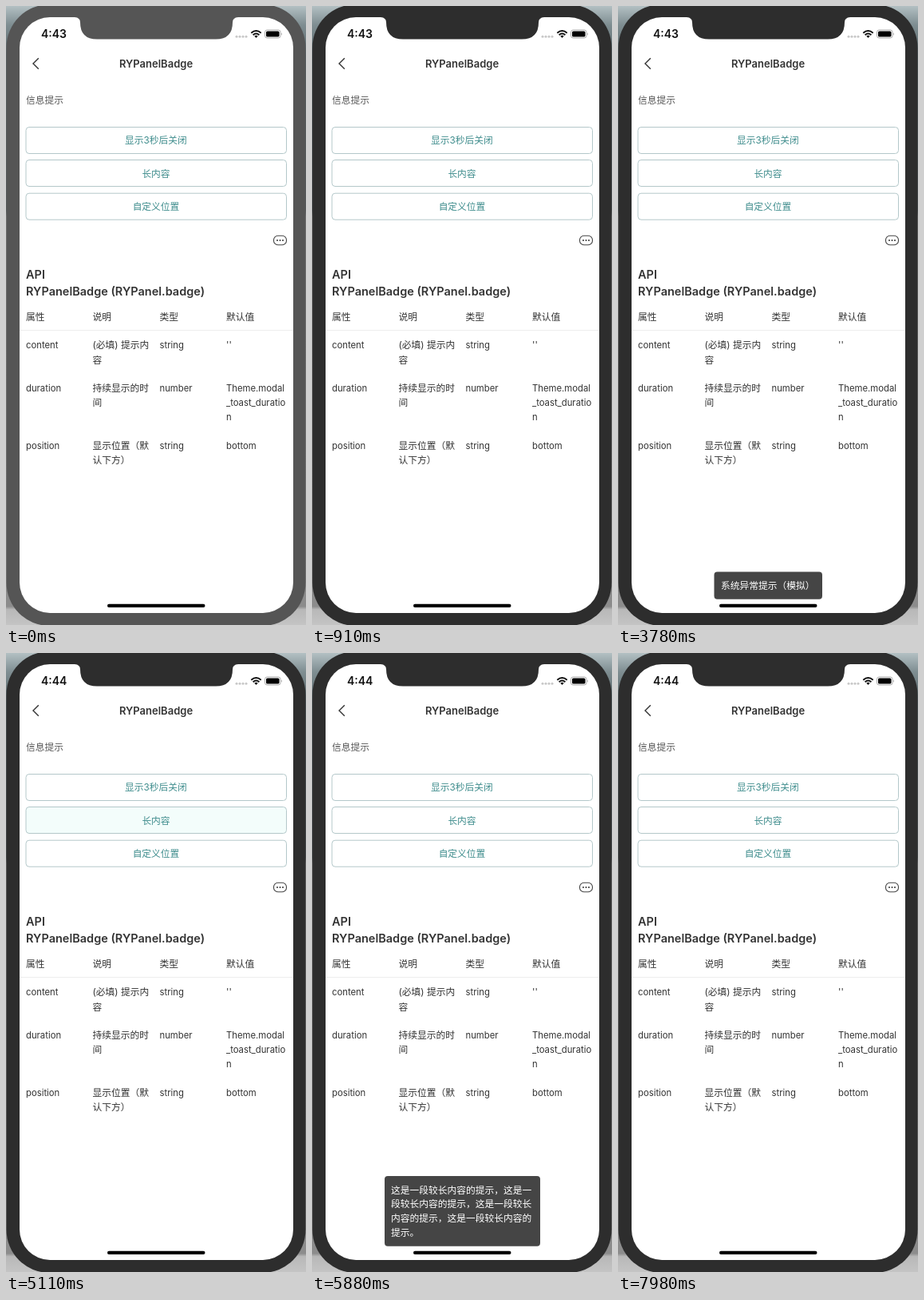
Recreate the animation shown at these times as an HTML page. Size 376 px wide and 774 px high, loop 8 s.

```html
<!DOCTYPE html>
<html lang="zh-CN">
<head>
<meta charset="utf-8">
<title>Toast demo</title>
<style>
  html, body { margin: 0; width: 100%; height: 100%; overflow: hidden; background: #777; }
  svg { display: block; width: 376px; height: 774px; }
  text {
    font: 11.75px Inter, "Noto Sans CJK SC", "Noto Sans CJK", sans-serif;
    fill: #333;
    white-space: pre;
  }
  .latin text { font-size: 11.3px; }
  .middle { text-anchor: middle; }
  .clock text { font-size: 14px; font-weight: 600; fill: #111; }
  .title { font-size: 13px; font-weight: 600; }
  .heading text { font-size: 14.5px; font-weight: 600; }
  .label { fill: #555; }
  .buttons rect { fill: #fff; stroke: #b4c8ca; }
  .buttons text { fill: #3f8d8d; text-anchor: middle; }
  .toast rect { fill: #454545; }
  .toast text { fill: #fff; }

  .bezel, .clock text, .toast, .buttons .press { animation: 8s step-end infinite; }
  .bezel { fill: #2d2d2d; animation-name: wake; }
  .clock .before { animation-name: before; }
  .clock .after { animation-name: after; }
  .short { animation-name: short; }
  .long { animation-name: long; }
  .press.first { animation-name: press-first; }
  .press.second { animation-name: press-second; }

  @keyframes wake { 0% { fill: #555; } 11.375%, 100% { fill: #2d2d2d; } }
  @keyframes before { 0% { opacity: 1; } 56.875%, 100% { opacity: 0; } }
  @keyframes after { 0% { opacity: 0; } 56.875%, 100% { opacity: 1; } }
  @keyframes short {
    0% { opacity: 0; }
    13.125% { opacity: .5; }
    14% { opacity: 1; }
    52.5% { opacity: .5; }
    53.375%, 100% { opacity: 0; }
  }
  @keyframes long {
    0% { opacity: 0; }
    64.75% { opacity: .5; }
    65.625% { opacity: 1; }
    98% { opacity: .65; }
    98.875% { opacity: .2; }
    99.75%, 100% { opacity: 0; }
  }
  @keyframes press-first {
    0% { fill: #fff; }
    12.25% { fill: #f3fdfb; }
    13.125% { fill: #fafefd; }
    14%, 100% { fill: #fff; }
  }
  @keyframes press-second {
    0% { fill: #fff; }
    63.875% { fill: #f3fdfb; }
    64.75% { fill: #fafefd; }
    65.625%, 100% { fill: #fff; }
  }
</style>
</head>
<body>
<svg viewBox="0 0 376 774">
  <defs>
    <linearGradient id="backdrop" x2="0" y2="1">
      <stop offset="0" stop-color="#b3c0c3"/>
      <stop offset=".03" stop-color="#7f8e92"/>
      <stop offset=".08" stop-color="#59666a"/>
      <stop offset=".33" stop-color="#596063"/>
      <stop offset=".34" stop-color="#858585"/>
      <stop offset=".97" stop-color="#8c8c8c"/>
      <stop offset=".975" stop-color="#b8b8b8"/>
      <stop offset="1" stop-color="#c4c4c4"/>
    </linearGradient>
  </defs>

  <rect width="376" height="774" fill="url(#backdrop)"/>
  <rect class="bezel" x=".5" y="-2" width="375" height="777" rx="54"/>
  <rect x="17" y="14" width="343" height="745" rx="38" fill="#fff"/>
  <path class="bezel" d="M86 13V14Q93 14.500 93 20.500Q93 41.500 114 41.500H263Q284 41.500 284 20.500Q284 14.500 291 14V13Z"/>

  <g class="clock">
    <text class="before" x="44" y="40.300">4:43</text>
    <text class="after" x="44" y="40.300">4:44</text>
  </g>

  <g fill="#c8c8c8">
    <circle cx="289" cy="38.300" r="1.500"/><circle cx="293" cy="38.300" r="1.500"/>
    <circle cx="297" cy="38.300" r="1.500"/><circle cx="301" cy="38.300" r="1.500"/>
  </g>
  <g fill="none" stroke="#111" stroke-width="1.900">
    <path d="M307.300 33.700Q313.500 28.300 319.700 33.700M309.600 36.200Q313.500 32.800 317.400 36.200"/>
    <path d="M311.300 37.600Q313.500 35.900 315.700 37.600L313.500 39.900Z" fill="#111" stroke="none"/>
  </g>
  <rect x="324.500" y="30" width="19.500" height="10" rx="2.800" fill="none" stroke="#aaa"/>
  <rect x="326" y="31.500" width="16.500" height="7" rx="1.600" fill="#000"/>
  <path d="M345.200 33.500Q347 35 345.200 36.800Z" fill="#999"/>

  <path d="M40.800 65.200L34 72L40.800 78.800" fill="none" stroke="#333" stroke-width="1.400"/>
  <text class="title middle" x="188" y="76.500">RYPanelBadge</text>
  <text class="label" x="25" y="122">信息提示</text>

  <g class="buttons">
    <rect class="press first" x="25" y="151.500" width="326.500" height="33" rx="4"/>
    <rect class="press second" x="25" y="192.500" width="326.500" height="33" rx="4"/>
    <rect x="25" y="234.200" width="326.500" height="33" rx="4"/>
    <text x="188" y="172.300">显示3秒后关闭</text>
    <text x="188" y="213.800">长内容</text>
    <text x="188" y="255.300">自定义位置</text>
  </g>

  <rect x="335.500" y="287.300" width="16" height="11.400" rx="5.300" fill="none" stroke="#444" stroke-width="1.100"/>
  <g fill="#333">
    <circle cx="340" cy="293" r="1"/><circle cx="343.500" cy="293" r="1"/><circle cx="347" cy="293" r="1"/>
  </g>

  <g class="heading">
    <text x="25" y="340.500">API</text>
    <text x="25" y="362.300">RYPanelBadge (RYPanel.badge)</text>
  </g>

  <text x="25" y="392.500">属性</text>
  <text x="108.500" y="392.500">说明</text>
  <text x="192.500" y="392.500">类型</text>
  <text x="276" y="392.500">默认值</text>
  <path d="M17 405.500H360" stroke="#eee"/>

  <g class="latin">
    <text x="25" y="428">content</text>
    <text x="192.500" y="428">string</text>
    <text x="276" y="428">''</text>
    <text x="25" y="482">duration</text>
    <text x="192.500" y="482">number</text>
    <text x="276" y="482">Theme.modal</text>
    <text x="276" y="500">_toast_duratio</text>
    <text x="276" y="518">n</text>
    <text x="25" y="553.800">position</text>
    <text x="192.500" y="553.800">string</text>
    <text x="276" y="553.800">bottom</text>
  </g>
  <text x="108.500" y="428.300">(必填) 提示内</text>
  <text x="108.500" y="446.500">容</text>
  <text x="108.500" y="482.300">持续显示的时</text>
  <text x="108.500" y="500.300">间</text>
  <text x="108.500" y="554">显示位置（默</text>
  <text x="108.500" y="572">认下方）</text>

  <g class="toast short">
    <rect x="120.500" y="707.500" width="135.500" height="34.300" rx="4"/>
    <text x="129" y="729.300">系统异常提示（模拟）</text>
  </g>
  <g class="toast long">
    <rect x="91" y="654" width="195" height="87.800" rx="4"/>
    <text x="99" y="675.800">这是一段较长内容的提示，这是一</text>
    <text x="99" y="693.400">段较长内容的提示，这是一段较长</text>
    <text x="99" y="711">内容的提示，这是一段较长内容的</text>
    <text x="99" y="728.600">提示。</text>
  </g>

  <rect x="127" y="747.800" width="122.500" height="4.200" rx="2.100" fill="#000"/>
</svg>
</body>
</html>
```
